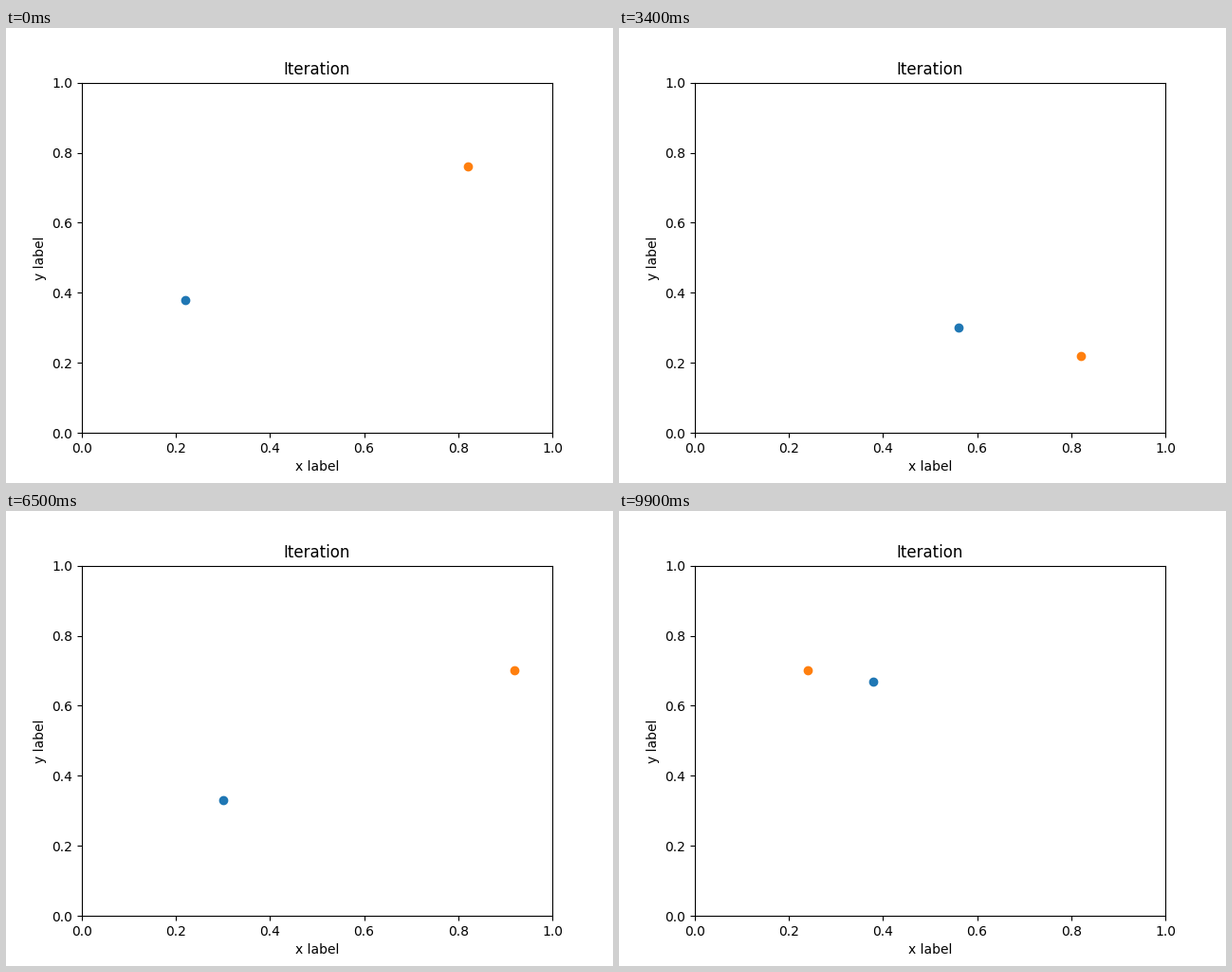
A matplotlib script that plays this animation: 640x480 px, repeating every 10 s.

```python
import numpy as np
import matplotlib.pyplot as plt
from matplotlib.animation import FuncAnimation

FRAMES = 100
INTERVAL = 100
LOW, HIGH = 2, 98   # walls, in hundredths of the axis
REACH = 4           # distance at which the balls collide


def simulate(pos, vel):
    """Positions of both balls for every frame, in hundredths."""
    pos, vel = np.array(pos), np.array(vel)
    path = [pos.copy()]
    for _ in range(FRAMES - 1):
        pos = pos + vel
        vel = np.where((pos < LOW) | (pos > HIGH), -vel, vel)
        gap = pos[0] - pos[1]
        if gap @ gap < REACH ** 2:
            # push the balls apart along the line between them
            push = 2 * ((vel[0] - vel[1]) @ gap) / (gap @ gap) * gap
            push = np.rint(push).astype(int)
            vel = vel + np.array([-push, push])
        path.append(pos.copy())
    return np.array(path) / 100


path = simulate(pos=[(22, 38), (82, 76)], vel=[(1, 4), (1, 3)])

fig, ax = plt.subplots(figsize=(6.4, 4.8), dpi=100)
ax.set(xlim=(0, 1), ylim=(0, 1), title="Iteration",
       xlabel="x label", ylabel="y label")
balls = [ax.plot([], [], "o", color=c)[0] for c in ("tab:blue", "tab:orange")]


def draw(i):
    for ball, (x, y) in zip(balls, path[i]):
        ball.set_data([x], [y])
    return balls


anim = FuncAnimation(fig, draw, frames=FRAMES, interval=INTERVAL,
                     init_func=lambda: draw(0), repeat=True, repeat_delay=0)
plt.show()
```
